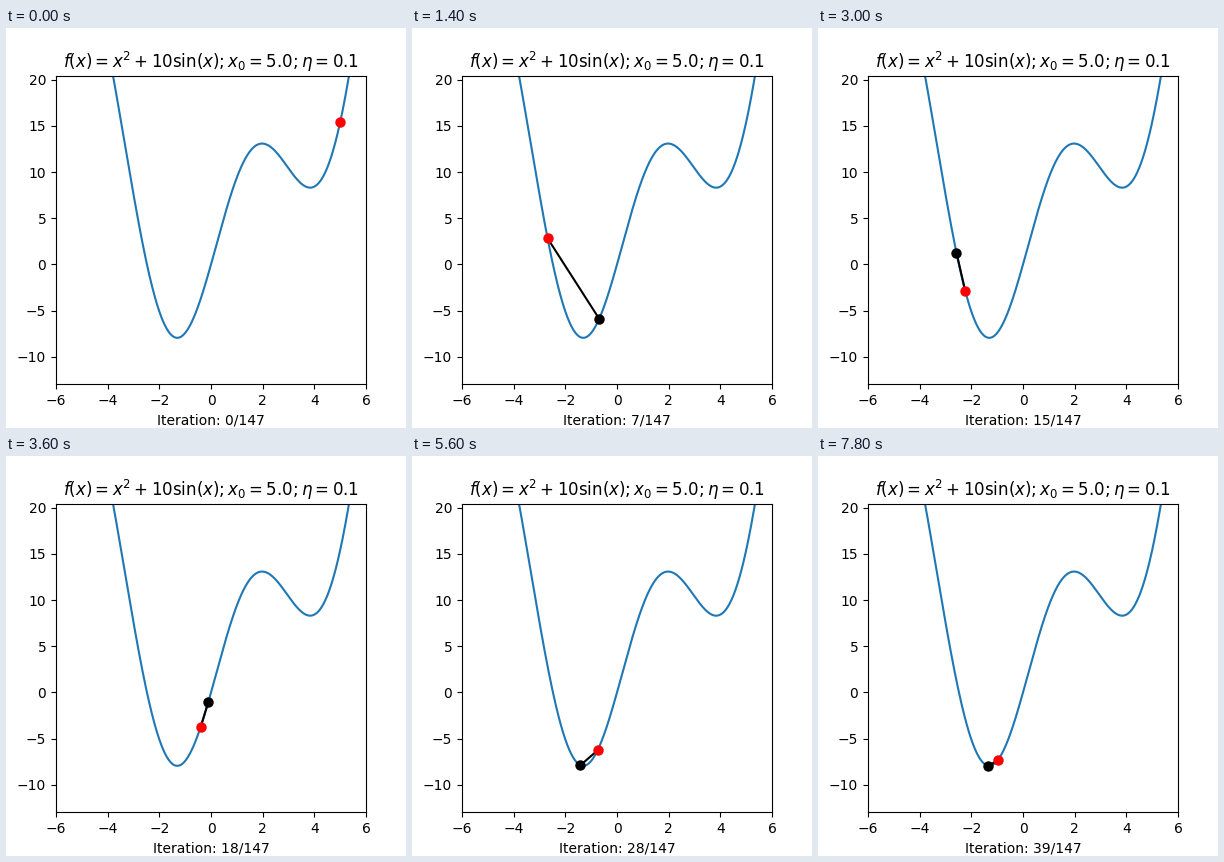
A matplotlib script that plays this animation: 400 by 400 pixels, repeating every 8 s.

```python
import numpy as np
import matplotlib.pyplot as plt
from matplotlib.animation import FuncAnimation

X0, ETA, GAMMA = 5.0, 0.1, 0.9
FRAMES, TOTAL = 40, 147


def f(x):
    return x**2 + 10 * np.sin(x)


def grad(x):
    return 2 * x + 10 * np.cos(x)


def descend(x, steps):
    """Gradient descent with momentum; returns all visited points."""
    path, v = [x], 0.0
    for _ in range(steps):
        v = GAMMA * v + ETA * grad(x)
        x -= v
        path.append(x)
    return np.array(path)


path = descend(X0, FRAMES - 1)
grid = np.linspace(-6, 6, 1000)

fig, ax = plt.subplots(figsize=(4, 4), dpi=100)
ax.plot(grid, f(grid))
ax.set_xlim(-6, 6)
ax.set_ylim(f(grid).min() - 5, f(X0) + 5)
ax.set_xticks(range(-6, 7, 2))
ax.set_yticks(range(-10, 21, 5))
ax.set_title(r"$f(x) = x^2 + 10\sin(x); x_0 = 5.0; \eta = 0.1$")
label = ax.set_xlabel("")

dot = dict(marker="o", ms=6, mew=1.5, ls="")
link, = ax.plot([], [], "k-", lw=1.5, zorder=3)
prev, = ax.plot([], [], color="black", zorder=4, **dot)
curr, = ax.plot([], [], color="red", zorder=5, **dot)


def update(i):
    step = path[max(i - 1, 0):i + 1]
    link.set_data(step, f(step))
    prev.set_data(step[:-1], f(step[:-1]))
    curr.set_data(step[-1:], f(step[-1:]))
    label.set_text(f"Iteration: {i}/{TOTAL}")
    return link, prev, curr, label


anim = FuncAnimation(fig, update, frames=FRAMES, interval=200,
                     init_func=lambda: update(0), repeat=True, repeat_delay=0)
plt.show()
```
